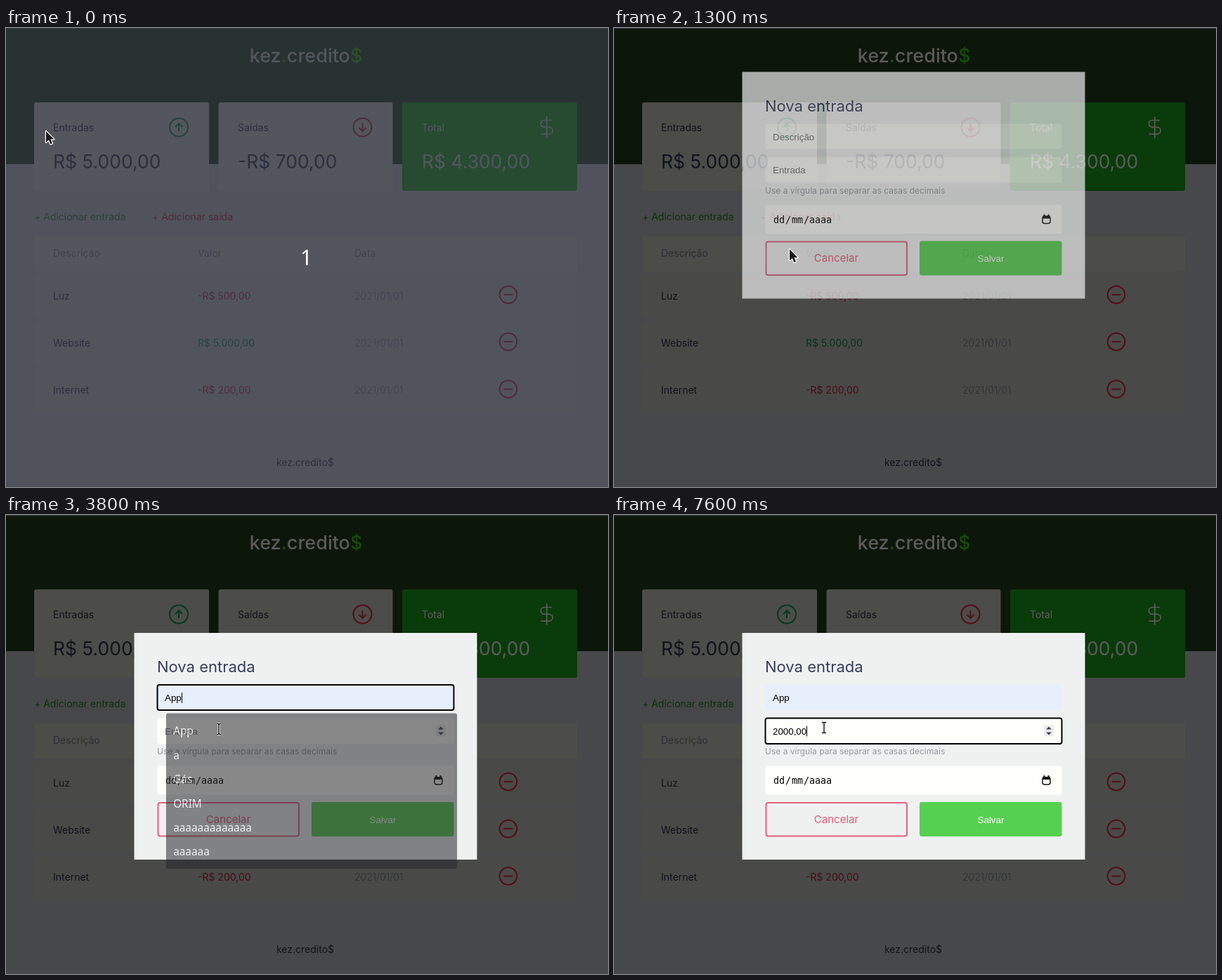
Write an HTML page with a canvas that moves like this. It is 857x654 px and loops after 8 s.

```html
<!DOCTYPE html>
<html lang="pt">
<head>
<meta charset="utf-8">
<title>Finanças</title>
<style>
html, body { margin: 0; width: 100%; height: 100%; overflow: hidden; background: #484849; }
canvas { display: block; }
</style>
</head>
<body>
<canvas id="stage" width="857" height="654"></canvas>
<script>
const W = 857, H = 654;
const main = document.getElementById('stage').getContext('2d');
const group = Object.assign(document.createElement('canvas'), { width: W, height: H }).getContext('2d');
let g = main;

const LOOP = 8000, STEP = 100;
const UI = 'Inter, sans-serif';
const FIELD = '13.33px "Liberation Sans", Arial, sans-serif';
const MONO = '13.33px "DejaVu Sans Mono", monospace';
const C = {
  page: '#f0f2f5', head: '#2d4a22', card: '#fffff4', row: '#f7f7f0', field: '#fffffb', ink: '#363f5f',
  mute: '#969cb3', green: '#20c820', lime: '#3dd705', red: '#e92945', up: '#12a454', modal: '#eff1f1'
};
const MODAL_AT = 900;
const MENU = ['App', 'a', 'Gás', 'ORIM', 'a'.repeat(13), 'a'.repeat(6)];
const TYPED = [[6000, '2'], [6200, '20'], [6400, '200'], [7000, '2000'], [7500, '2000,0'], [7600, '2000,00']];
const POINTER = [
  [0, 57, 147], [300, 35, 110], [400, 35, 110], [700, 106, 261], [1100, 106, 261],
  [1700, 538, 424], [2000, 660, 440], [2300, 538, 424], [2500, 538, 424],
  [2900, 299, 256], [3200, 299, 256], [3500, 303, 305], [3800, 303, 305],
  [4200, 538, 432], [4500, 538, 432], [4800, 300, 305], [5600, 300, 305], [5800, 299, 303]
];

const within = (v, a, b) => v >= a && v <= b;

// Paints on a separate canvas so that overlapping parts fade as one
function layer(alpha, paint) {
  g = group;
  g.clearRect(0, 0, W, H);
  g.save();
  paint();
  g.restore();
  g = main;
  g.globalAlpha = alpha;
  g.drawImage(group.canvas, 0, 0);
  g.globalAlpha = 1;
}

function box(x, y, w, h, fill, r = 3) {
  g.fillStyle = fill;
  g.beginPath();
  g.roundRect(x, y, w, h, r);
  g.fill();
}

function frame(x, y, w, h, color, lw = 2) {
  g.strokeStyle = color;
  g.lineWidth = lw;
  g.beginPath();
  g.roundRect(x, y, w, h, 3);
  g.stroke();
}

function text(s, x, y, font, color, align = 'left') {
  g.font = font;
  g.fillStyle = color;
  g.textAlign = align;
  g.fillText(s, x, y);
  return g.measureText(s).width;
}

function line(color, lw, ...pts) {
  g.strokeStyle = color;
  g.lineWidth = lw;
  g.beginPath();
  pts.forEach(([x, y], i) => i ? g.lineTo(x, y) : g.moveTo(x, y));
  g.stroke();
}

function poly(color, ...pts) {
  g.fillStyle = color;
  g.beginPath();
  pts.forEach(([x, y]) => g.lineTo(x, y));
  g.fill();
}

function ring(x, y, r, color) {
  g.strokeStyle = color;
  g.lineWidth = 2;
  g.beginPath();
  g.arc(x, y, r, 0, 7);
  g.stroke();
}

function arrowIcon(x, y, dir, color) {
  ring(x, y, 13, color);
  line(color, 2, [x, y - 5.5], [x, y + 5.5]);
  line(color, 2, [x - 5, y + dir * 0.5], [x, y + dir * 5.5], [x + 5, y + dir * 0.5]);
}

const DOLLAR = new Path2D('M12 1V23M17 5H9.5a3.5 3.5 0 0 0 0 7h5a3.5 3.5 0 0 1 0 7H6');

// Light and coloured marks, which stay readable below the modal shade
function accents() {
  const parts = [['kez', '#fff'], ['.', C.lime], ['credito', '#fff'], ['$', C.lime]];
  const font = '500 27px ' + UI;
  g.font = font;
  let x = 427 - parts.reduce((w, p) => w + g.measureText(p[0]).width, 0) / 2;
  for (const [s, color] of parts) x += text(s, x, 49, font, color);

  arrowIcon(246, 141.5, -1, C.up);
  arrowIcon(507.5, 141.5, 1, C.red);
  text('Total', 592, 146.5, '14px ' + UI, '#fff');
  text('R$ 4.300,00', 592, 200, '26.5px ' + UI, '#fff');
  g.save();
  g.translate(753, 124.5);
  g.scale(1.4, 1.4);
  g.strokeStyle = '#fff';
  g.lineWidth = 1.2;
  g.stroke(DOLLAR);
  g.restore();

  for (const y of [380, 447, 514.5]) {
    ring(715, y, 12.3, C.red);
    line(C.red, 2, [708.5, y], [721.5, y]);
  }
}

function page(hover) {
  const small = '14px ' + UI, big = '26.5px ' + UI;
  g.fillStyle = C.page;
  g.fillRect(0, 0, W, H);
  g.fillStyle = C.head;
  g.fillRect(0, 0, W, 194);
  box(40, 106, 249, 126, C.card);
  box(302.5, 106, 248, 126, C.card);
  box(564, 106, 249, 126, C.green);
  text('Entradas', 67, 146.5, small, C.ink);
  text('R$ 5.000,00', 67, 200, big, C.ink);
  text('Saídas', 330, 146.5, small, C.ink);
  text('-R$ 700,00', 330, 200, big, C.ink);
  text('+ Adicionar entrada', 40, 274, small, hover ? C.lime : '#2fa02a');
  text('+ Adicionar saída', 208, 274, small, C.red);

  box(40, 297, 773, 50, C.card);
  [['Descrição', 67], ['Valor', 273], ['Data', 496]].forEach(([s, x]) => text(s, x, 326, small, C.mute));
  const rows = [['Luz', '-R$ 500,00', C.red], ['Website', 'R$ 5.000,00', C.up], ['Internet', '-R$ 200,00', C.red]];
  rows.forEach(([name, value, color], i) => {
    const y = 351.5 + i * 67.4;
    box(40, y, 773, 61.5, C.row);
    text(name, 67, y + 35, small, C.ink);
    text(value, 273, y + 35, small, color);
    text('2021/01/01', 496, y + 35, '300 14px ' + UI, C.mute);
  });
  text('kez.credito$', 426, 624, small, C.ink, 'center');
  accents();
}

function shade(color, alpha) {
  g.globalAlpha = alpha;
  g.fillStyle = color;
  g.fillRect(0, 0, W, H);
  g.globalAlpha = 1;
}

function countdown(k) {
  shade('#282c36', 0.8 * k);
  g.globalAlpha = k;
  text('1', 427.5, 338, '500 30px "Noto Sans", sans-serif', '#fff', 'center');
  g.globalAlpha = 1;
}

function shake(t) {
  const odd = t / STEP % 2;
  if (within(t, 2500, 3400)) return odd ? 5 : -6.5;
  if (within(t, 4500, 5300)) return odd ? -9.5 : 3;
  return 0;
}

function input(x, y, h, value, hint, focus, fill = C.field) {
  box(x, y, 422, h, fill);
  if (focus) frame(x, y, 422, h, '#000');
  const w = text(value || hint, x + 10.5, y + 23, FIELD, value ? '#000' : '#757575');
  if (focus) {
    g.fillStyle = '#000';
    g.fillRect(Math.round(x + 10.5 + (value ? w : 0)), y + 11, 1, 15);
  }
}

function spinner(x, y) {
  box(x - 7, y - 8, 14, 16, '#ececec', 2);
  poly('#444', [x - 4, y - 2], [x, y - 6], [x + 4, y - 2]);
  poly('#444', [x - 4, y + 2], [x, y + 6], [x + 4, y + 2]);
}

function calendar(x, y) {
  frame(x, y + 2, 11, 10, '#111', 1.5);
  g.fillStyle = '#111';
  g.fillRect(x, y + 1, 11, 4);
  g.fillRect(x + 1.5, y - 1, 2, 3);
  g.fillRect(x + 7.5, y - 1, 2, 3);
}

function form(t, over) {
  const dx = 215.5 + shake(t);
  const filled = t >= 3700;
  const typed = TYPED.reduce((s, [at, v]) => t >= at ? v : s, '');
  const inDesc = within(t, 2900, 4400), inValue = t >= 5700;
  const onSave = within(t, 2500, 2800) || within(t, 4500, 5600);

  g.fillStyle = C.modal;
  g.fillRect(182.5, 168, 488, 323);
  text('Nova entrada', 215, 224, '22px ' + UI, C.ink);
  input(filled ? 215.5 : dx, 242, 36, filled ? 'App' : '', 'Descrição', inDesc, filled ? '#e6effb' : C.field);
  input(dx, 289.5, 36.5, typed, 'Entrada', inValue);
  if (inValue || over === 'value') spinner(dx + 403.5, 307.5);
  text('Use a vírgula para separar as casas decimais', 215, 341, '12px ' + UI, '#96999f');
  box(dx, 357.5, 422, 41, C.field);
  [['dd', 11.5], ['/', 28.5], ['mm', 37.5], ['/', 54.5], ['aaaa', 62.5]]
    .forEach(([s, x]) => text(s, dx + x, 383, MONO, '#000'));
  calendar(dx + 394.5, 372);
  frame(216.5, 410, 200.5, 47.5, '#e0607e');
  text('Cancelar', 316.5, 438.5, '15px ' + UI, '#e65c78', 'center');
  box(435, 409, 202.5, 49, over === 'save' ? '#0ab40a' : '#56d050');
  if (onSave) frame(435.5, 409, 202, 49, '#000');
  text('Salvar', 536.5, 438.5, FIELD, '#fff', 'center');
}

function modal(t, over) {
  const left = 1 - Math.min((t - 820) / 1000, 1);
  const shown = 1 - left * left;
  layer(Math.pow(shown, 1.2), () => {
    g.translate(0, -390 * (1 - shown));
    form(t, over);
  });
}

function menu(t) {
  if (!within(t, 2900, 3800)) return;
  const fading = t === 2900 || t === 3800;
  layer(fading ? 0.55 : 1, () => {
    const s = fading ? 0.977 : 1;
    g.translate(435, 393);
    g.scale(s, s);
    g.translate(-435, -393);
    box(223, 280, 424, 226.5, '#27282c');
    MENU.forEach((item, i) => text(item, 233.5, 311.5 + i * 35.2, '500 15.7px "Noto Sans", sans-serif', '#f0f1f1'));
  });
}

function pointer(t) {
  let i = POINTER.findIndex(p => p[0] > t);
  if (i < 0) i = POINTER.length;
  const a = POINTER[i - 1], b = POINTER[i] || a;
  const k = b === a ? 0 : (t - a[0]) / (b[0] - a[0]);
  const x = a[1] + (b[1] - a[1]) * k, y = a[2] + (b[2] - a[2]) * k;
  const menuOpen = within(t, 2900, 3700);
  let over = '';
  if (t < MODAL_AT) {
    if (within(x, 40, 177) && within(y, 260, 278)) over = 'link';
  } else if (t >= 1500) {
    if (within(x, 435, 638) && within(y, 409, 458)) over = 'save';
    else if (within(x, 215, 638)) {
      if (within(y, 242, 278)) over = 'desc';
      else if (within(y, 289, 326) && !menuOpen) over = 'value';
      else if (within(y, 357, 398) && !menuOpen) over = 'date';
    }
  }
  return { x, y, over };
}

const ARROW = new Path2D('M0 0V16L3.8 12.6L6.4 18.6L9 17.4L6.4 11.6H11.4Z');
const HAND = new Path2D('M-1.5 0.5Q0 -1.5 1.5 0.5V6L8 7.5Q10 8 9.5 10L8 16H0L-5 10Q-5.5 7.5 -3.5 8L-1.5 9.5Z');
const BEAM = new Path2D('M-3 -7.5H-1L0 -6.5L1 -7.5H3M0 -6.5V6.5M-3 7.5H-1L0 6.5L1 7.5H3');

function cursor({ x, y, over }) {
  g.save();
  g.translate(x, y);
  g.lineJoin = 'round';
  if (over === 'save' || over === 'link') {
    g.fillStyle = '#fff';
    g.strokeStyle = '#111';
    g.lineWidth = 1.4;
    g.fill(HAND);
    g.stroke(HAND);
    for (const fx of [2, 4.5, 7]) line('#111', 0.9, [fx, 7], [fx, 10]);
  } else if (over) {
    g.strokeStyle = '#fff';
    g.lineWidth = 3;
    g.stroke(BEAM);
    g.strokeStyle = '#111';
    g.lineWidth = 1.4;
    g.stroke(BEAM);
  } else {
    g.strokeStyle = '#fff';
    g.lineWidth = 2.4;
    g.stroke(ARROW);
    g.fillStyle = '#1c1c1e';
    g.fill(ARROW);
  }
  g.restore();
}

function draw(now) {
  const t = Math.floor(now % LOOP / STEP) * STEP;
  const mouse = pointer(t);
  page(mouse.over === 'link');
  if (t < 300) countdown(1 - t / 300);
  if (t >= MODAL_AT) {
    shade('#000', 0.7);
    layer(0.08, accents);
    modal(t, mouse.over);
    menu(t);
  }
  g.fillStyle = '#37424a';
  g.fillRect(0, 0, W, 1);
  cursor(mouse);
}

let start;
function tick(now) {
  start ??= now;
  draw(now - start);
  requestAnimationFrame(tick);
}
requestAnimationFrame(tick);
</script>
</body>
</html>
```
